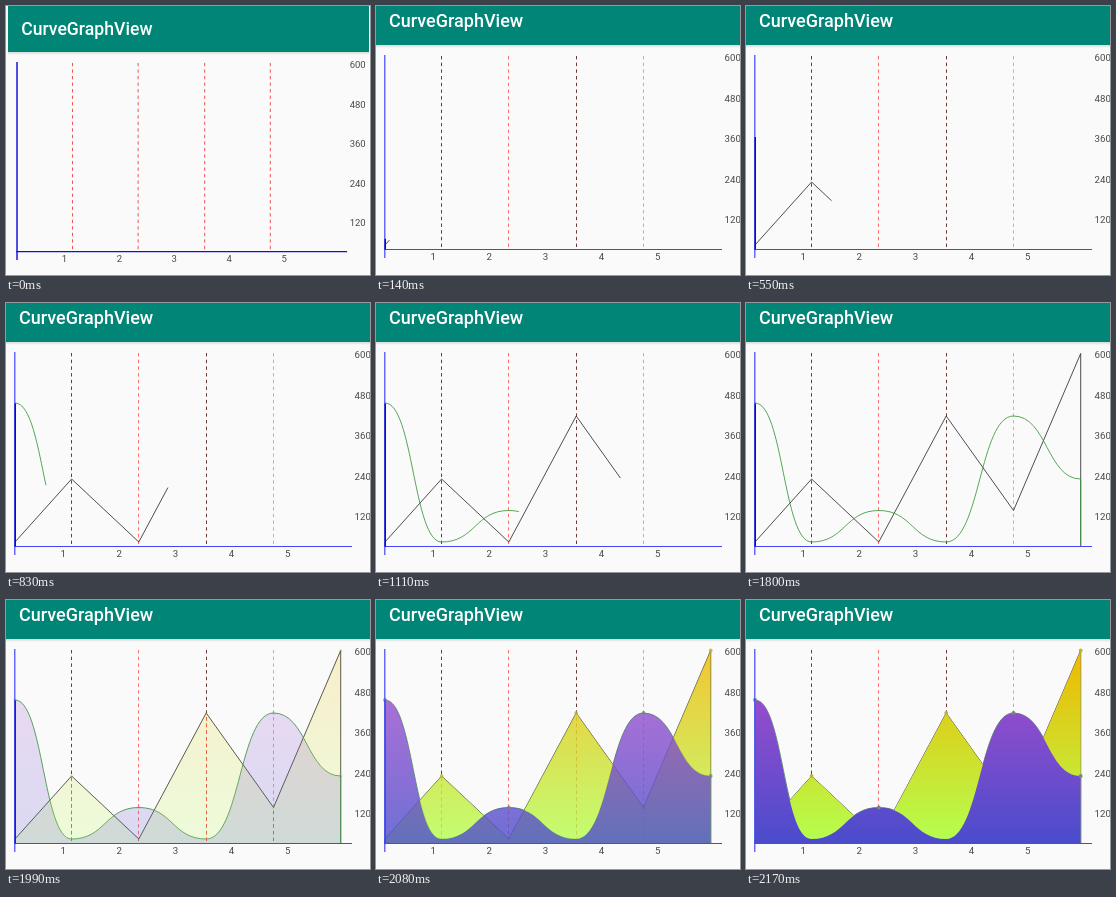
Animation, 364 px wide and 269 px high, one loop 2.92 s. Source, as an HTML page with a canvas:

```html
<!DOCTYPE html>
<html lang="en">
<head>
<meta charset="utf-8">
<title>CurveGraphView</title>
<style>
html, body { margin: 0; width: 100%; height: 100%; overflow: hidden; background: #fafafa; }
canvas { display: block; }
</style>
</head>
<body>
<canvas id="stage" width="364" height="269"></canvas>
<script>
const c = document.getElementById('stage').getContext('2d');
const LOOP = 2920, BASE = 243.5, LEFT = 9, RIGHT = 334.7;
const xs = [LEFT, 65.6, 132.8, 200.2, 267.5, RIGHT];
const peaks = [239, 176, 239, 113, 207.5, 50.5];
const waves = [100, 239, 207.5, 239, 113, 176];
const gridColors = ['#484848', '#ff7070', '#6b3838', '#b4b4b4'];

const clamp = v => Math.min(1, Math.max(0, v));
const ease = v => (1 - Math.cos(Math.PI * clamp(v))) / 2;

function outline(ys, smooth) {
  const p = new Path2D();
  p.moveTo(LEFT, BASE);
  p.lineTo(LEFT, ys[0]);
  for (let i = 1; i < xs.length; i++) {
    const mid = (xs[i - 1] + xs[i]) / 2;
    if (smooth) p.bezierCurveTo(mid, ys[i - 1], mid, ys[i], xs[i], ys[i]);
    else p.lineTo(xs[i], ys[i]);
  }
  p.lineTo(RIGHT, BASE);
  return p;
}

function gradient(top, bottom) {
  const g = c.createLinearGradient(0, 50, 0, BASE);
  g.addColorStop(0, top);
  g.addColorStop(1, bottom);
  return g;
}

const peakPath = outline(peaks, false), wavePath = outline(waves, true);
const gold = gradient('#f0b800', '#b4ff50');
const violet = gradient('#b04ccc', '#4a4ccc');

function line(x1, y1, x2, y2, color, width, dash = []) {
  c.setLineDash(dash);
  c.strokeStyle = color;
  c.lineWidth = width;
  c.beginPath();
  c.moveTo(x1, y1);
  c.lineTo(x2, y2);
  c.stroke();
}

function trace(path, length, color) {
  c.setLineDash([length, 9999]);
  c.strokeStyle = color;
  c.lineWidth = .85;
  c.stroke(path);
}

function grid(color) {
  xs.slice(1, 5).forEach((x, i) =>
    line(Math.floor(x) + .5, 50, Math.floor(x) + .5, BASE, color || gridColors[i], 1, [3.4, 3.3]));
}

function dots(ys, color) {
  c.fillStyle = color;
  xs.forEach((x, i) => {
    if (ys[i] === 239) return;
    c.beginPath();
    c.arc(x, ys[i], 1.9, 0, 7);
    c.fill();
  });
}

function header(x, width, bottom) {
  const g = c.createLinearGradient(0, bottom, 0, bottom + 3);
  g.addColorStop(0, '#d4d8d7');
  g.addColorStop(1, '#fafafa');
  c.fillStyle = g;
  c.fillRect(x, bottom, width, 3);
  c.fillStyle = '#008577';
  c.fillRect(x, 0, width, bottom);
}

function labels() {
  c.fillStyle = '#fff';
  c.textAlign = 'left';
  c.font = '500 18px Roboto, sans-serif';
  c.fillText('CurveGraphView', 13, 21);
  c.fillStyle = '#484848';
  c.font = '9.7px Roboto, sans-serif';
  for (let i = 0; i < 5; i++) {
    c.fillText(600 - i * 120, 348.6, 55.3 + i * 40.5);
  }
  c.textAlign = 'center';
  for (let i = 0; i < 5; i++) c.fillText(i + 1, 57.2 + i * 56.1, 254.2);
}

function draw(t) {
  const intro = t < 40;
  c.setTransform(1, 0, 0, 1, 0, 0);
  c.globalAlpha = 1;
  c.fillStyle = '#fafafa';
  c.fillRect(0, 0, 364, 269);
  if (intro) {
    header(2, 361, 46);
    c.setTransform(.979, 0, 0, .975, 2.4, 8.2);
  } else {
    header(0, 364, 39);
  }
  labels();
  grid(intro && '#f05050');

  const drawn = intro ? 0 : ease((t + 38) / 2825);
  const filled = ease((t - 1930) / 215);
  if (drawn) {
    trace(peakPath, drawn * 1126, '#303030');
    trace(wavePath, drawn * 1086, '#3c963c');
  }
  if (filled) {
    c.save();
    c.clip(peakPath);
    grid('#f04848');
    c.restore();
    c.globalAlpha = filled;
    c.fillStyle = gold;
    c.fill(peakPath);
    dots(peaks, '#b8b43c');
    c.fillStyle = violet;
    c.fill(wavePath);
    dots(waves, '#6c8c78');
    c.globalAlpha = 1;
  }

  const axis = intro ? '#1010d8' : '#4444ff', weight = intro ? 1.5 : 1.2;
  line(LEFT - .2, 49, LEFT - .2, 252, axis, weight);
  line(LEFT - 1, BASE, 346, BASE, axis, weight);
  if (drawn) {
    c.globalAlpha = 1 - filled;
    line(LEFT + .3, BASE, LEFT + .3, BASE - Math.min(143, drawn * 1086), '#0808d0', 1.4);
  }
}

const start = performance.now();
function tick() {
  draw((performance.now() - start) % LOOP);
  requestAnimationFrame(tick);
}
tick();
</script>
</body>
</html>
```
